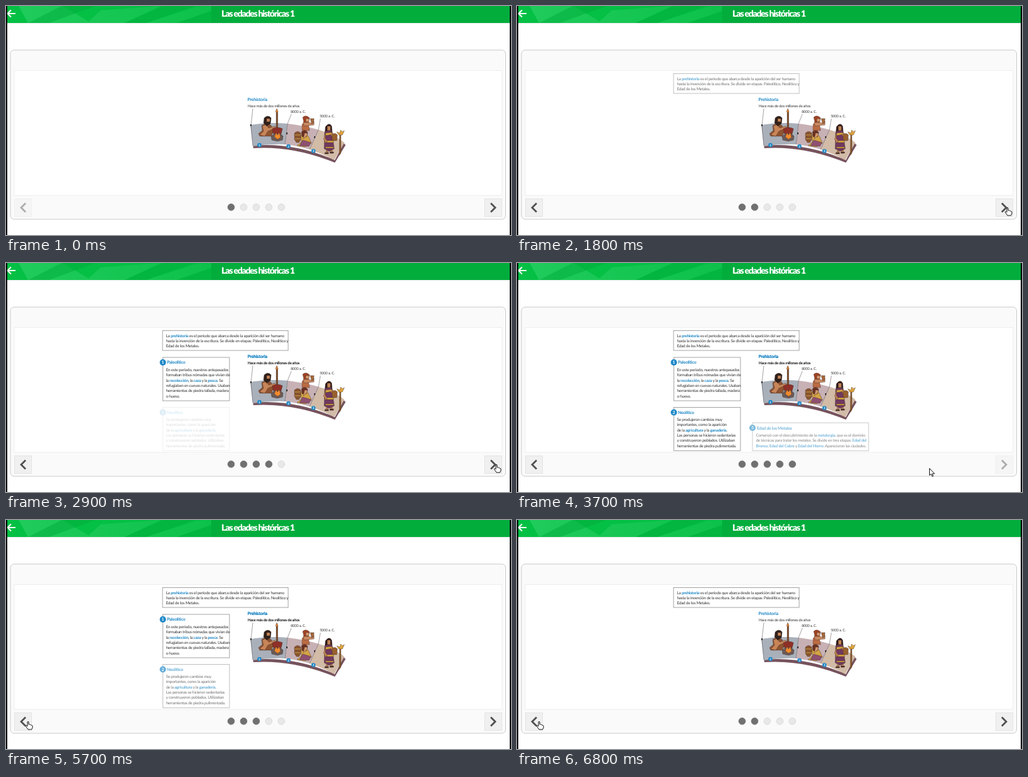
Animation of 800 by 364 pixels, one loop 7400 ms. Source, as an HTML page:

```html
<!DOCTYPE html>
<html lang="es">
<head>
<meta charset="utf-8">
<title>Las edades históricas 1</title>
<style>
html, body { margin: 0; width: 100%; height: 100%; overflow: hidden; background: #fff; }
svg { display: block; width: 800px; height: 364px; }
text { font-family: Lato, "Open Sans", sans-serif; letter-spacing: -.24px; fill: #333; white-space: pre; text-rendering: geometricPrecision; }
.b { font-weight: 700; fill: #1c86c4; }
.n { font-weight: 700; fill: #fff; text-anchor: middle; letter-spacing: 0; }
#title { font-size: 14px; font-weight: 900; letter-spacing: -1.25px; fill: #fff; text-anchor: middle; }
.chevron { fill: none; stroke: #505050; stroke-width: 2.8; }
.button { fill: #f0f0f0; stroke: #e4e4e4; }
</style>
</head>
<body>
<svg viewBox="0 0 800 364">
  <defs>
    <linearGradient id="glow"><stop stop-color="#2bd066"/><stop offset="1" stop-color="#10c24c"/></linearGradient>
  </defs>
  <path fill="#eee" d="M2 27H798V28H2Z"/>
  <path fill="#02ad3c" d="M2 0H798V27H2Z"/>
  <path fill="#04c044" d="M2 0H325V27H2Z"/>
  <path fill="url(#glow)" opacity=".7" d="M20 0H90L135 27H35ZM128 27L150 7L245 0L188 27ZM222 27L300 2L325 0V8L270 27Z"/>
  <path fill="#00ae3c" opacity=".5" d="M35 27L88 0H142L68 27ZM188 27L248 0H300L222 27ZM270 27L325 8V27Z"/>
  <path fill="none" stroke="#fff" stroke-width="2" d="M15 12H3M8 6.5L2.5 12L8 17.5"/>
  <text id="title" x="399" y="17">Las edades históricas 1</text>

  <rect x="7" y="70" width="784.5" height="269" rx="6" fill="#fafafa" stroke="#c9c9c9"/>
  <rect x="13" y="102.500" width="772.500" height="198.500" fill="#fff" stroke="#eee"/>
  <g id="prev"><rect class="button" x="13.500" y="306.500" width="27" height="28"/><path class="chevron" d="M31 313.500L24 320.500L31 327.500"/></g>
  <g id="next"><rect class="button" x="758.500" y="306.500" width="27" height="28"/><path class="chevron" d="M768 313.500L775 320.500L768 327.500"/></g>
  <g id="dots"></g>
  <g id="scene"></g>
  <g id="steps"></g>
  <path fill="#000" d="M0 0H2V364H0ZM798 0H800V364H798Z"/>
  <g id="cursor" fill="#fff" stroke="#111" stroke-linejoin="round">
    <path id="hand" d="M-1 1Q0 -.5 1 1V5Q3 4 3.300 5.500Q5 5 5.300 6.500Q7 6 7 8V10L5.500 13H0L-3.500 8Q-4 6.500 -2.500 6.500L-1 8Z"/>
    <path id="arrow" d="M0 0V11L2.500 9L4.500 13L6 12.300L4.300 8.500H8Z"/>
  </g>
</svg>
<script>
const $ = id => document.getElementById(id);
const add = (parent, markup) => parent.insertAdjacentHTML('beforeend', markup);
const shape = (fill, d, extra = '') => `<path fill="${fill}" d="${d}" ${extra}/>`;
const label = (x, y, s, cls = '', size = 6.4) => `<text x="${x}" y="${y}" class="${cls}" font-size="${size}">${s}</text>`;
const badge = (x, y, r, n) => `<circle cx="${x}" cy="${y}" r="${r}" fill="#2189c8"/>` + label(x, y + r * .48, n, 'n', r * 1.35);
// Words between asterisks are emphasised.
const lines = (x, y, list) => list.map((s, i) =>
  label(x, y + i * 8.3, s.replace(/\*(.+?)\*/g, '<tspan class="b">$1</tspan>'))).join('');
const box = (x, y, w, h) => `<rect x="${x}" y="${y}" width="${w}" height="${h}" fill="#fff" stroke="#8d8d8d" stroke-width=".8"/>`;
const heading = label(382.5, 151, 'Prehistoria', 'b', 7) + label(383, 161, 'Hace más de dos millones de años', '', 6);

const art = [
  ['#76535d', 'M391 222Q455 216 521 245L535 218L538 221L521 249Q455 222 392 226Z'],
  ['#a9b0ba', 'M387 189Q417 184 446 187L442 220Q416 219 391 223Z'],
  ['#c7b1b5', 'M446 187Q472 190 496 197L481 228Q462 222 442 220Z'],
  ['#d2bba7', 'M496 197Q519 204 536 217L520 245Q502 235 481 228Z'],
  // Hunter by the fire
  ['#8f5330', 'M405 190Q413 184 420 190L424 199L420 207H402L400 203L406 198Z'],
  ['#c78558', 'M406 191L412 188L416 194L426 191L427 194L415 199L410 207L402 205L408 199Z'],
  ['#302019', 'M409 178Q415 172 420 178L419 187L413 191L408 186Z'],
  ['#c78558', 'M413 179H418V184H413Z'],
  ['#7b4a27', 'M428 168H430.500V202H428Z'],
  ['#d9822f', 'M429 163L431 168L429 170L427 168Z'],
  ['#8e3028', 'M422 195Q430 191 438 195L436 203Q429 207 423 202Z'],
  ['#6b5a55', 'M420 207L425 203H435L439 207L438 213L430 215L421 213Z'],
  ['#f08a2d', 'M425 208L428 201L430 205L433 201L435 209L430 212Z'],
  // Potters
  ['#bb6b43', 'M469 188Q474 182 479 188L481 198H469Z'],
  ['#c98961', 'M471 184L478 184L485 187L485 183L488 183V189L480 190L472 191Z'],
  ['#9f4324', 'M470 177Q475 172 481 178L479 185H472Z'],
  ['#d59a6f', 'M475 179H480V184H475Z'],
  ['#a5683c', 'M482 179H488L487 186L484 187Z'],
  ['#8c562d', 'M457 202Q462 197 467 202V212L464 217H460L457 212Z'],
  ['#c99145', 'M457 204H467V206H457ZM457 210H467V212H457Z'],
  ['#d3a345', 'M467 206Q473 200 479 207L484 218L474 224L461 222L468 216Z'],
  ['#8f5072', 'M470 213L483 217L480 223L465 222Z'],
  ['#6b3020', 'M468 200Q474 195 478 201L476 208H469Z'],
  ['#d59a6f', 'M473 202H477V206L471 211Z'],
  // Farmer with basket and staff
  ['#2e1c1a', 'M506 192Q512 184 516 191L517 205H505Z'],
  ['#c28455', 'M509 191H514V198H509ZM507 230H510V234H507ZM514 228H517V234H514Z'],
  ['#70395f', 'M505 199L516 198L520 227L512 231L504 227Z'],
  ['#d9a83d', 'M506 202L517 201V204L506 206ZM505 214H519V217H505ZM506 224H519V226H506Z'],
  ['#c28455', 'M517 201L522 208L519 210L514 205ZM506 203L503 212L508 217L509 214L506 211Z'],
  ['#98602e', 'M516 205Q521 200 525 205L524 214H517Z'],
  ['#8a5a29', 'M528.500 202H530.500V234L528 237Z'],
  ['#e0a43b', 'M524 200L529 202L530 197L533 200L536 198L533 205L527 205Z'],
  ['#4a302b', 'M505 233H511V235H505ZM513 232H519V234H513Z']
];
add($('scene'), art.map(([fill, d], i) =>
  shape(fill, d, i > 3 ? 'stroke="#3d2928" stroke-width=".4"' : '')).join('') +
  '<path d="M391 163L388 190L391 222M452 172L446 187L442 220M498 179L495 197L481 228" fill="none" stroke="#675e64" stroke-width=".6"/>' +
  shape('#333', 'M387 188h2v3h-2ZM444 201h2v3h-2ZM488 207h2v3h-2Z') +
  heading + label(451, 169.5, '8000 a. C.', '', 5.8) + label(497, 176.5, '5000 a. C.', '', 5.8) +
  badge(401.5, 221, 3.3, 1) + badge(447.5, 223, 3.3, 2) + badge(487, 230.5, 3.3, 3));

const steps = [
  box(248, 107.5, 199, 31.5) + lines(253.5, 117.5, [
    'La *prehistoria* es el período que abarca desde la aparición del ser humano',
    'hasta la invención de la escritura. Se divide en etapas: Paleolítico, Neolítico y',
    'Edad de los Metales.']),
  box(248.5, 150, 105.5, 69) + badge(248.5, 158, 5, 1) + label(255, 160.3, 'Paleolítico', 'b', 6.8) + lines(253.5, 172, [
    'En este período, nuestros antepasados',
    'formaban tribus nómadas que vivían de',
    'la *recolección*, la *caza* y la *pesca*. Se',
    'refugiaban en cuevas naturales. Usaban',
    'herramientas de piedra tallada, madera',
    'o hueso.']) + heading,
  box(248.5, 229.5, 105.5, 69) + badge(248.5, 237.5, 5, 2) + label(255, 239.8, 'Neolítico', 'b', 6.8) + lines(253.5, 251, [
    'Se produjeron cambios muy',
    'importantes, como la aparición',
    'de la *agricultura* y la *ganadería*.',
    'Las personas se hicieron sedentarias',
    'y construyeron poblados. Utilizaban',
    'herramientas de piedra pulimentada.']),
  box(373, 254, 184, 44.5) + badge(373, 262, 5, 3) + label(380, 264.5, 'Edad de los Metales', 'b', 6.8) + lines(378.5, 276, [
    'Comenzó con el descubrimiento de la *metalurgia*, que es el dominio',
    'de técnicas para tratar los metales. Se divide en tres etapas: *Edad del*',
    '*Bronce*, *Edad del Cobre* y *Edad del Hierro*. Aparecieron las ciudades.'])
];
steps.forEach(s => add($('steps'), `<g>${s}</g>`));
for (let i = 0; i < 5; i++) add($('dots'), `<circle cx="${356.6 + i * 19.9}" cy="319.8" r="5.3"/>`);

const LOOP = 7400, FADE = 400;
const shown = [1550, 2190, 2800, 3480], hidden = [LOOP + FADE, 6380, 5550, 4780];
const clamp = v => Math.max(0, Math.min(1, v));
const swing = v => .5 - Math.cos(Math.PI * clamp(v)) / 2;
// Time, x and y of the pointer.
const route = [[300, 745, 350], [800, 774, 329], [1000, 774, 329], [1200, 777, 320], [3600, 777, 320],
  [3900, 410, 339], [4200, 47, 322], [4500, 35, 320], [LOOP, 35, 320]];

function pointer(t) {
  const i = Math.max(1, route.findIndex(p => p[0] > t));
  const [a, b] = [route[i - 1], route[i]];
  const k = clamp((t - a[0]) / (b[0] - a[0]));
  return [a[1] + (b[1] - a[1]) * k, a[2] + (b[2] - a[2]) * k];
}

function draw(now) {
  const t = now % LOOP;
  const active = shown.filter((s, i) => t >= s && t < hidden[i]).length;
  [...$('steps').children].forEach((g, i) =>
    g.setAttribute('opacity', swing((t - shown[i]) / FADE) * (1 - swing((t - hidden[i]) / FADE))));
  [...$('dots').children].forEach((dot, i) => {
    dot.setAttribute('fill', i <= active ? '#707070' : '#e8e8e8');
    dot.setAttribute('stroke', i <= active ? '#767676' : '#dadada');
  });
  $('prev').setAttribute('opacity', active ? 1 : .45);
  $('next').setAttribute('opacity', active < 4 ? 1 : .45);
  const [x, y] = pointer(t);
  const over = y < 335 && (x > 758 || x < 41);
  $('cursor').setAttribute('transform', `translate(${x} ${y})`);
  $('cursor').style.display = t < 300 ? 'none' : '';
  $('hand').style.display = over ? '' : 'none';
  $('arrow').style.display = over ? 'none' : '';
  requestAnimationFrame(draw);
}
requestAnimationFrame(draw);
</script>
</body>
</html>
```
